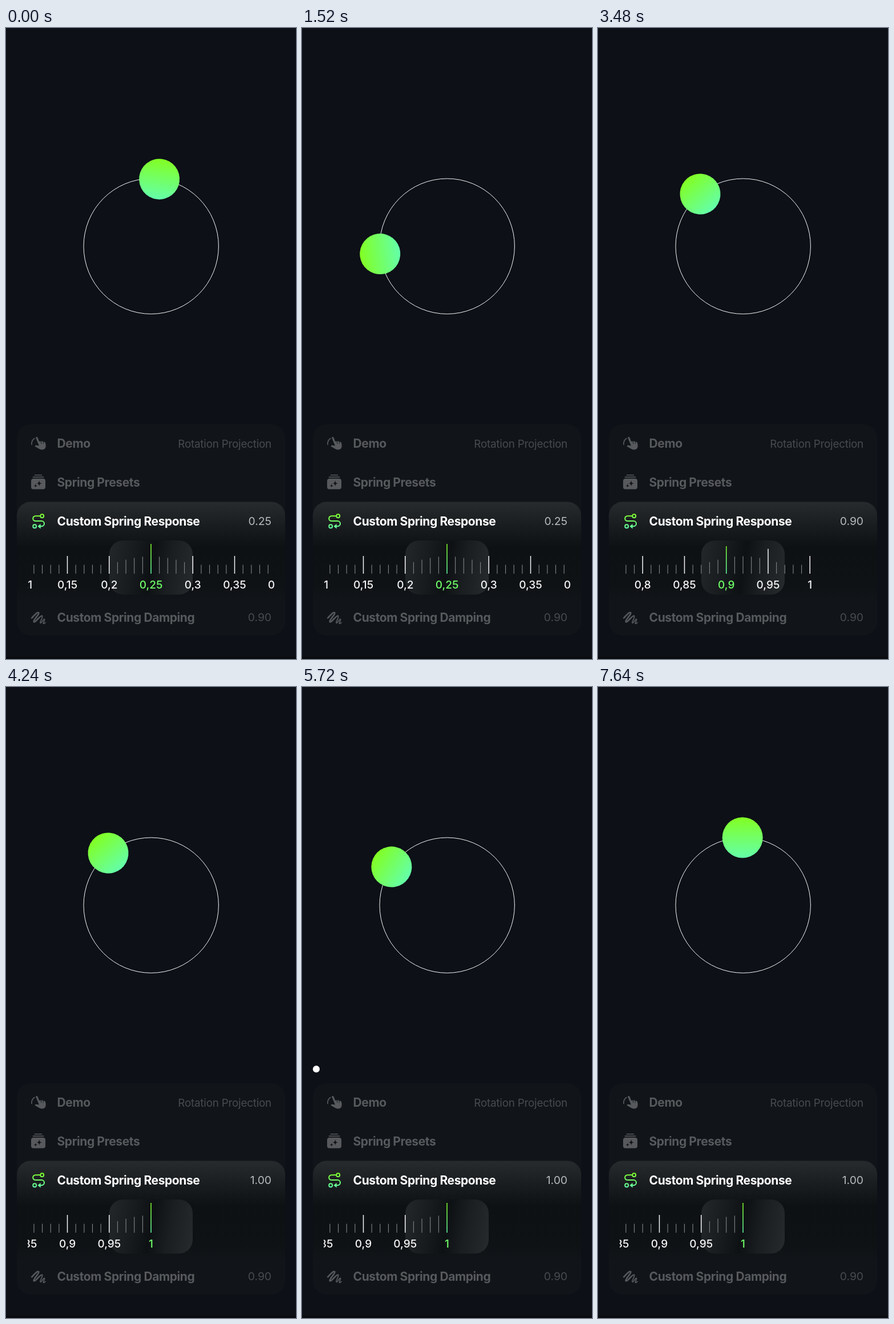
An HTML page with a canvas for the animation above (7990 ms loop, 508 by 1102 pixels).

```html
<!DOCTYPE html>
<html lang="en">
<head>
<meta charset="utf-8">
<title>Rotation projection</title>
<style>
html, body { margin: 0; width: 100%; height: 100%; overflow: hidden; background: #0d1017; }
canvas { display: block; width: 508px; height: 1102px; }
</style>
</head>
<body>
<canvas id="stage"></canvas>
<script>
const W = 508, H = 1102, LOOP = 7990, STEP = 20;
const LIME = '#82ff22', MINT = '#64ffaa', PANEL = '#111519';
const DIM = '#57595c', FAINT = '#484b4e';
const FONT = 'Inter, "Noto Sans", sans-serif';
const canvas = document.getElementById('stage');
const ctx = canvas.getContext('2d');
const dpr = window.devicePixelRatio || 1;
canvas.width = W * dpr;
canvas.height = H * dpr;

// Ball throws: a short drag, then a spring that keeps the release speed.
const DRAG = 0.1, DAMPING = 0.9;
const THROWS = [
  { start: 20, end: 540, from: 7, to: 263.5, response: 0.25, speed: 8 },
  { start: 1520, end: 2080, from: 263.5, to: 680.5, response: 0.25, speed: 8 },
  { start: 5040, end: 6100, from: -39.5, to: 308.1, response: 1, speed: 4.8 },
  { start: 6600, end: 7640, from: -51.9, to: 359.5, response: 1, speed: 4.8 }
];
const RULER = { start: 3160, from: 0.25, to: 1, rate: 11.9, lag: 25 };

function springRest(t, response, speed) {
  const w = 2 * Math.PI / response;
  const decay = DAMPING * w;
  const wd = w * Math.sqrt(1 - DAMPING * DAMPING);
  return Math.exp(-decay * t) * (Math.cos(wd * t) + (decay - speed) / wd * Math.sin(wd * t));
}

function throwAngle(m, ms) {
  const t = (ms - m.start) / 1000;
  const pull = m.speed * DRAG / 5;
  const rest = (m.to - m.from) / (1 + pull);
  if (t < DRAG) return m.from + rest * pull * Math.pow(t / DRAG, 5);
  return m.to - rest * springRest(t - DRAG, m.response, m.speed);
}

function ballState(ms) {
  let angle = THROWS[0].from, dot = false;
  for (const m of THROWS) {
    if (ms < m.start) break;
    angle = ms < m.end ? throwAngle(m, ms) : m.to;
    dot = ms >= m.start + DRAG * 1000 && ms < m.end;
  }
  return { angle, dot };
}

function rulerValue(ms) {
  const k = RULER.rate * Math.max(0, ms - RULER.start) / 1000;
  return RULER.to - (RULER.to - RULER.from) * (1 + k) * Math.exp(-k);
}

// Stops are [offset, color] pairs.
function gradient(x0, y0, x1, y1, ...stops) {
  const g = ctx.createLinearGradient(x0, y0, x1, y1);
  for (const [at, color] of stops) g.addColorStop(at, color);
  return g;
}

function greens(y0, y1) {
  return gradient(0, y0, 0, y1, [0, LIME], [1, MINT]);
}

function box(x, y, w, h, r, fill) {
  ctx.beginPath();
  ctx.roundRect(x, y, w, h, r);
  ctx.fillStyle = fill;
  ctx.fill();
}

function disc(x, y, r, fill) {
  ctx.beginPath();
  ctx.arc(x, y, r, 0, 7);
  ctx.fillStyle = fill;
  ctx.fill();
}

function stroke(path, width, color) {
  ctx.lineWidth = width;
  ctx.strokeStyle = color;
  ctx.lineCap = ctx.lineJoin = 'round';
  ctx.stroke(new Path2D(path));
}

function text(str, x, y, size, weight, color, align = 'left', spacing = 0) {
  ctx.font = `${weight} ${size}px ${FONT}`;
  ctx.letterSpacing = spacing + 'px';
  ctx.textAlign = align;
  ctx.fillStyle = color;
  ctx.fillText(str, x, y);
}

function title(str, y, color = DIM) {
  text(str, 89.5, y, 21, 700, color, 'left', -0.4);
}

function detail(str, y, color) {
  text(str, 465, y, 19.3, 400, color, 'right');
}

function handIcon() {
  stroke('M44.9 727.5C44.7 722.5 46.5 719 49.8 716.8', 1.7, DIM);
  stroke('M53.8 715.6L58.6 727', 3.2, DIM);
  ctx.fillStyle = DIM;
  ctx.fill(new Path2D('M58 723C59 720.9 61 721 61.8 722.6C63 721 65 721.4 65.6 723.2' +
    'C67 722.2 68.6 723 69 724.8C70.2 729 70 733 67.5 735.2C63.5 737.6 59.4 736.4 56 733.8' +
    'L51.4 731.2C50 729.6 51.4 728.2 53.2 728.8L57.6 729.6Z'));
  stroke('M61 722.5L62.2 726M64.8 722.5L65.8 725.8', 0.8, PANEL);
}

function sparkle(x, y, r) {
  ctx.beginPath();
  ctx.moveTo(x, y - r);
  for (const [dx, dy] of [[1, 0], [0, 1], [-1, 0], [0, -1]]) {
    ctx.quadraticCurveTo(x, y, x + dx * r, y + dy * r);
  }
  ctx.fillStyle = PANEL;
  ctx.fill();
}

function presetsIcon() {
  stroke('M50.5 780.7H62.5', 1.6, DIM);
  stroke('M47.5 784.3H65.5', 1.7, DIM);
  box(44, 787, 25, 18.6, 4, DIM);
  sparkle(58.2, 795.3, 5.6);
  sparkle(51.8, 799.4, 3.6);
}

function responseIcon() {
  const g = greens(848, 874);
  stroke('M60 852.2H51.6a4.4 4.4 0 0 0 0 8.8H62.4a4.6 4.6 0 0 1 0 9.2H60', 2, g);
  stroke('M66.2 852.2a3 3 0 1 1-6 0a3 3 0 1 1 6 0M53.2 870.2a3 3 0 1 1-6 0a3 3 0 1 1 6 0', 1.9, g);
  ctx.fillStyle = g;
  ctx.fill(new Path2D('M55.4 870.2L60.6 866V874.4Z'));
}

function dampingIcon() {
  stroke('M45.2 1030.4C49 1026.5 54.6 1019.2 57 1021C59.6 1023.4 46.6 1034.4 48.8 1037.2' +
    'C51 1039.4 60.4 1025 63.2 1026.8', 2.6, DIM);
  stroke('M63.2 1026.8C65.6 1029 58.4 1037 60.2 1039C62 1040.2 65.2 1031.4 67.4 1032.4' +
    'C68.8 1033.6 64.2 1039 65.4 1040C66.4 1040.6 67.8 1039.6 68.8 1038.4', 1.8, DIM);
}

function drawBall({ angle, dot }) {
  const cx = 254.2, cy = 381.2, r = 118.2;
  ctx.beginPath();
  ctx.arc(cx, cy, r, 0, 7);
  ctx.lineWidth = 1;
  ctx.strokeStyle = '#f6f7f8';
  ctx.stroke();
  ctx.save();
  ctx.translate(cx, cy);
  ctx.rotate(angle * Math.PI / 180);
  ctx.translate(0, -r);
  disc(0, 0, 35.5, greens(-35.5, 35.5));
  ctx.restore();
  if (dot) disc(25, 667.2, 6, '#fff');
}

function drawRuler(value, picked) {
  const gap = 14.65, mid = 254, base = 953;
  const pos = value * 100;
  const green = greens(901, base);
  ctx.save();
  ctx.beginPath();
  ctx.rect(38, 890, 432, 105);
  ctx.clip();
  for (let i = Math.max(0, Math.ceil(pos - 19)); i <= Math.min(100, pos + 19); i++) {
    const off = i - pos, x = mid + off * gap;
    const major = i % 5 === 0, on = i === picked;
    const lift = Math.abs(off) < 5 ? Math.cos(Math.PI * off / 10) : 0;
    const h = major ? 31 + 21 * lift : 15.5 + 15 * lift;
    const w = major || on ? 1.5 : 1.1;
    ctx.fillStyle = on ? green : major ? '#f4f4f5' : '#828486';
    ctx.fillRect(x - w / 2, base - h, w, h);
    if (major) {
      const label = String(i / 100).replace('.', ',');
      text(label, x, 978.6, 19, 500, on ? '#70ff68' : '#f5f5f6', 'center');
    }
  }
  ctx.restore();
}

function drawPanel(ms) {
  const picked = Math.round(rulerValue(ms - RULER.lag) * 100);
  box(19, 692, 470, 369, 24, PANEL);
  box(19, 827.5, 470, 175, [24, 24, 0, 0], gradient(0, 827.5, 0, 1002.5,
    [0, '#272b2d'], [0.25, '#191c1f'], [0.45, '#0e1114'], [0.85, '#0f1215'], [1, PANEL]));

  handIcon();
  title('Demo', 733.2);
  text('Rotation Projection', 465, 732.8, 18.8, 400, FAINT, 'right', -0.2);
  presetsIcon();
  title('Spring Presets', 800.6);

  responseIcon();
  title('Custom Spring Response', 868.8, '#fff');
  detail((picked / 100).toFixed(2), 868, '#b8babc');

  box(181, 895, 146, 94.5, 24, gradient(181, 930, 327, 954,
    [0, '#222628'], [0.28, '#181b1e'], [0.5, '#0e1114'], [0.72, '#1b1e21'], [1, '#25292b']));
  drawRuler(rulerValue(ms), picked);

  dampingIcon();
  title('Custom Spring Damping', 1036.8);
  detail('0.90', 1036, FAINT);
}

function draw(ms) {
  ctx.setTransform(dpr, 0, 0, dpr, 0, 0);
  ctx.fillStyle = '#0d1017';
  ctx.fillRect(0, 0, W, H);
  ctx.fillStyle = '#090b0f';
  ctx.fillRect(0, 1098, W, 4);
  drawBall(ballState(ms));
  drawPanel(ms);
}

const begin = performance.now();
function tick() {
  const ms = (performance.now() - begin) % LOOP;
  draw(Math.floor(ms / STEP) * STEP);
  requestAnimationFrame(tick);
}
tick();
</script>
</body>
</html>
```
